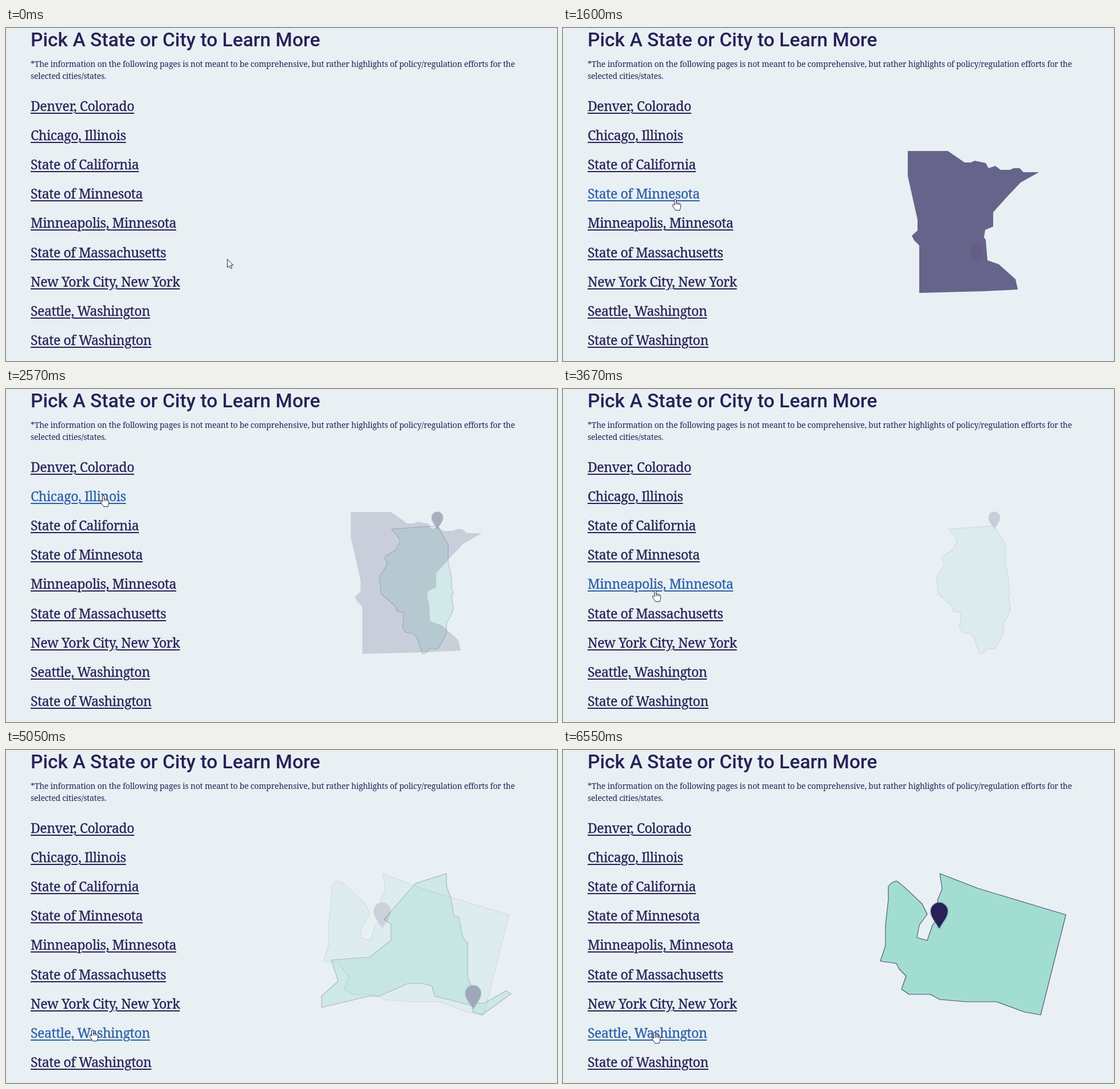
Animation of 962 by 582 pixels, one loop 6.77 s. Source, as an HTML page:

```html
<!DOCTYPE html>
<html lang="en">
<head>
<meta charset="utf-8">
<title>Pick a state or city</title>
<style>
  html, body { margin: 0; width: 100%; height: 100%; overflow: hidden; background: #e8f0f3; }
  body { position: relative; color: #292057; }
  h1, p, a, svg { position: absolute; margin: 0; white-space: nowrap; }
  h1 { left: 43px; top: 1px; font: 450 33.5px/40px Roboto, sans-serif; }
  p { left: 43px; top: 52px; font: 400 14px/21px "Noto Serif", serif; letter-spacing: -.22px; }
  a {
    left: 43px; font: 500 23px/30px "Noto Serif", serif; letter-spacing: -.42px;
    -webkit-text-stroke: .3px;
    text-decoration: underline; text-decoration-thickness: 2px; text-underline-offset: 3px;
  }
  a.on { color: #2c5fa9; }
  svg { left: 0; top: 0; }
  .land { fill: #a2ddd2; stroke: #4b4b7b; stroke-width: 1.1; stroke-linejoin: round; }
  .solid { fill: #292057; }
  .pin { fill: #292057; filter: drop-shadow(0 .12px .1px rgba(20, 15, 50, .5)); }
  .cursor { fill: #fff; stroke: #262238; stroke-linejoin: round; }
</style>
</head>
<body>
<h1>Pick A State or City to Learn More</h1>
<p>*The information on the following pages is not meant to be comprehensive, but rather highlights of policy/regulation efforts for the<br>selected cities/states.</p>
<svg width="962" height="582" viewBox="0 0 962 582">
  <defs>
    <path id="minnesota" d="M602 215H672L701 235H712L719 232 738 236 743 245 755 241 764 248H780L787 245H797L804 252H831L799 270 778 292 751 322V347L737 353 735 366 738 370 741 406 761 413 790 439 794 457 735 460 622 463V380L613 371 609 363 619 354V335L602 259Z"/>
    <path id="pin" d="M0 0C-.35-.75-1-1.3-1-2.05A1 1 0 0 1 1-2.05C1-1.3.35-.75 0 0Z"/>
  </defs>
  <g id="il">
    <path class="land" d="M673 245 753 239 772 272V303L778 331V350L781 355 778 363 781 383 778 393 769 409V428L754 454H739L733 462 727 463 718 436 712 428 697 425 692 415 694 408V391L682 388 680 380 655 358 652 328 663 311 666 303 661 297 664 291 679 283 688 267 687 262Z"/>
    <use class="pin" href="#pin" transform="translate(753 245) scale(10)"/>
  </g>
  <g id="mn"><use class="solid" href="#minnesota"/></g>
  <g id="mpls">
    <use class="land" href="#minnesota"/>
    <use class="pin" href="#pin" transform="translate(722.5 411) scale(10.8)"/>
  </g>
  <g id="ny">
    <path class="land" d="M551 430 580 404 568 367 635 362 672 333V304L660 296 715 233 769 216V237L777 260 782 291H790L798 328 806 337V396L812 413 815 443 836 442 873 421 882 426 831 463 815 458V447L748 430 744 413 727 408H702L652 430H635L551 450Z"/>
    <use class="pin" href="#pin" transform="translate(815.7 453) scale(13.7)"/>
  </g>
  <g id="wa">
    <path class="land" d="M568 238Q575 230 582 229 588 231 627 269L636 287 622 306 618 328 636 333 645 306 656 292 654 262 662 243 658 216 725 242 878 288 834 463 806 458 757 440H703L658 436 641 427H604L591 418 599 395 587 383 582 373 554 369 563 342V306L568 262Z"/>
    <use class="pin" href="#pin" transform="translate(656.8 312) scale(14.8)"/>
  </g>
  <g id="cursor" class="cursor">
    <path id="arrow" d="M.5 0V14.6L3.9 11.5 6.3 16.4 8.6 15.4 6.3 10.6H10.8Z"/>
    <path id="hand" d="M-1.5 11V1.8A1.5 1.5 0 0 1 1.5 1.8V7C1.8 5.8 4.2 5.9 4.2 7.6 4.6 6.5 6.9 6.7 6.9 8.3 7.3 7.4 9.4 7.7 9.4 9.4V14C9.4 16.2 8 17 8 19.6H.3C0 17-4.8 13.5-4.8 10.8-4.8 9-2.6 9.2-1.5 11ZM1.5 7V10M4.2 7.6V10.2M6.9 8.3V10.4"/>
  </g>
</svg>
<script>
const LOOP = 6770, FADE = 450, QUICK = 100;
const TOP = 121, PITCH = 51.1, ROW = 30, LEFT = 43;
const $ = id => document.getElementById(id);
const ease = x => { x = Math.min(1, Math.max(0, x)); return x * x * (3 - 2 * x); };

// label and the map it reveals
const places = [
  ["Denver, Colorado"], ["Chicago, Illinois", "il"], ["State of California"],
  ["State of Minnesota", "mn"], ["Minneapolis, Minnesota", "mpls"], ["State of Massachusetts"],
  ["New York City, New York", "ny"], ["Seattle, Washington", "wa"], ["State of Washington"]
];
const links = places.map(([label], i) => {
  const a = document.createElement("a");
  a.textContent = label;
  a.style.top = Math.round(TOP + i * PITCH) + "px";
  document.body.insertBefore(a, document.querySelector("svg"));
  return a;
});

// pointer moves: begin, end, and where it comes to rest
const home = [386, 404];
const moves = [
  { from: 20, to: 620, at: [240, 343] },
  { from: 1030, to: 1400, at: [196, 299] },
  { from: 2125, to: 2480, at: [170, 186] },
  { from: 3215, to: 3990, at: [155, 449] },
  { from: 4655, to: 5105, at: [151, 491] },
  { from: 6380, to: 6550, at: [160, 493] }
];

function pointer(t) {
  return moves.reduce((p, m) => {
    const f = ease((t - m.from) / (m.to - m.from));
    return p.map((v, i) => v + (m.at[i] - v) * f);
  }, home);
}

function linkUnder([x, y]) {
  const i = Math.floor((y - TOP) / PITCH);
  const inside = links[i] && y - TOP - i * PITCH < ROW && x < LEFT + links[i].offsetWidth;
  return inside ? i : -1;
}

// Follow the pointer once to learn when each link is hovered.
const visits = [];
for (let t = 0, last = -1; t < LOOP; t += 5) {
  const link = linkUnder(pointer(t));
  if (link >= 0 && link !== last) visits.push({ link, enter: t });
  if (link >= 0) visits[visits.length - 1].leave = t + 5;
  last = link;
}
// Links that are only brushed past reveal nothing.
const shows = visits.filter(v => places[v.link][1] && v.leave - v.enter > QUICK);

function draw(t) {
  const p = pointer(t), active = linkUnder(p);
  for (const { link, enter, leave } of shows) {
    const alpha = ease((t - enter) / FADE) - ease((t - leave) / FADE);
    $(places[link][1]).setAttribute("opacity", alpha);
  }
  links.forEach((a, i) => a.classList.toggle("on", i === active));
  $("cursor").setAttribute("transform", `translate(${p.map(Math.round)})`);
  $("hand").setAttribute("visibility", active < 0 ? "hidden" : "visible");
  $("arrow").setAttribute("visibility", active < 0 ? "visible" : "hidden");
}

const start = performance.now();
function tick() {
  draw((performance.now() - start) % LOOP);
  requestAnimationFrame(tick);
}
tick();
</script>
</body>
</html>
```
